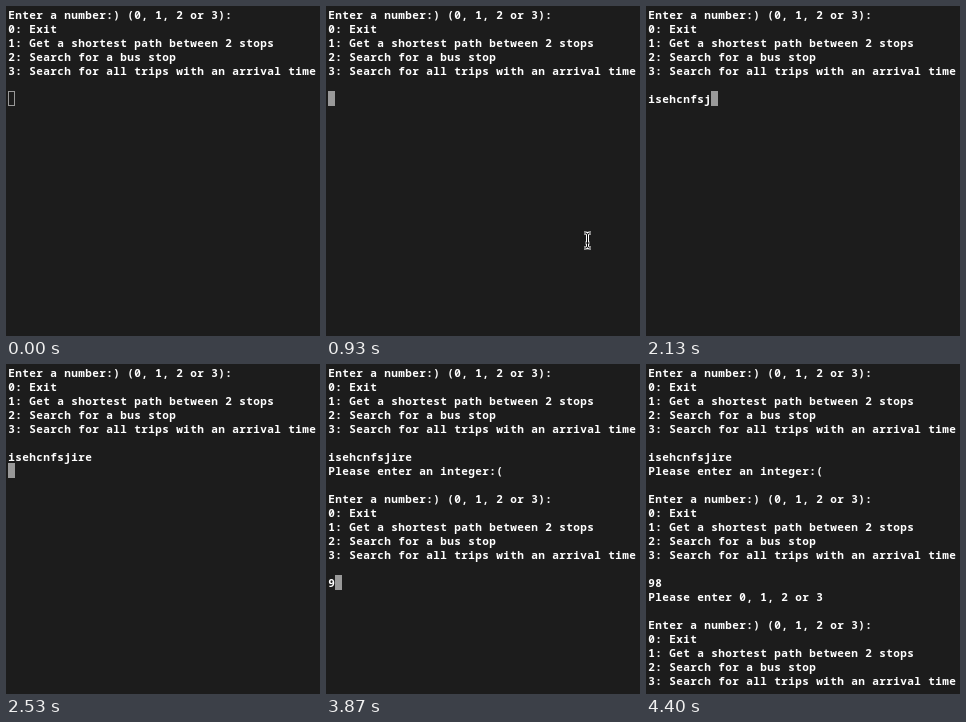
These frames come from a looping animation (314x330 px, 6740 ms). An HTML page with a canvas:

```html
<!DOCTYPE html>
<html lang="en">
<head>
<meta charset="utf-8">
<title>Terminal menu</title>
<style>
html, body { margin: 0; width: 100%; height: 100%; overflow: hidden; background: #1c1c1c; }
canvas { display: block; }
</style>
</head>
<body>
<canvas id="stage" width="314" height="330"></canvas>
<script>
const ctx = document.getElementById('stage').getContext('2d');
const LOOP = 6740, CELL = 7, LINE = 14, LEFT = 2;

const menu = [
  'Enter a number:) (0, 1, 2 or 3):',
  '0: Exit',
  '1: Get a shortest path between 2 stops',
  '2: Search for a bus stop',
  '3: Search for all trips with an arrival time',
  '', ''
].join('\n');
const word = 'isehcnfsjire';
const wrong = menu + word + '\n';
const again = wrong + 'Please enter an integer:(\n\n' + menu;
const outside = again + '98\n';

// Terminal contents from each start time on; the block cursor follows the last character.
const screens = [
  [0, menu],
  ...[[1800, 1], [1870, 3], [1930, 4], [2000, 6], [2130, 9], [2330, 12]]
    .map(([time, count]) => [time, menu + word.slice(0, count)]),
  [2530, wrong],
  [2600, again],
  [3870, again + '9'],
  [4070, again + '98'],
  [4270, outside],
  [4330, outside + 'Please enter 0, 1, 2 or 3\n\n'],
  [4400, outside + 'Please enter 0, 1, 2 or 3\n\n' + menu]
];

// Mouse pointer centre from each start time on.
const pointers = [
  [0, null], [530, [301.5, 240.5]], [600, [265.5, 240.5]],
  [800, [261.5, 234.5]], [1730, null]
];

const at = (steps, time) => steps.findLast(([start]) => start <= time)[1];

function drawText(text) {
  ctx.font = '600 11px "Noto Sans Mono", "DejaVu Sans Mono", monospace';
  ctx.textAlign = 'center';
  ctx.fillStyle = '#fff';
  text.split('\n').forEach((line, row) => {
    [...line].forEach((char, col) =>
      ctx.fillText(char, LEFT + (col + 0.5) * CELL, 13 + row * LINE));
  });
}

function drawCursor(text, focused) {
  const lines = text.split('\n');
  const x = LEFT + lines.at(-1).length * CELL;
  const y = 1 + (lines.length - 1) * LINE;
  ctx.fillStyle = ctx.strokeStyle = '#999';
  ctx.lineWidth = 1;
  if (focused) ctx.fillRect(x, y, CELL, 15);
  else ctx.strokeRect(x + 0.5, y + 0.5, CELL - 1, 14);
}

function drawPointer([x, y]) {
  const beam = new Path2D('M-3.5-7.5H-2Q0-7.5 0-5.5Q0-7.5 2-7.5H3.5' +
    'M0-5.5V5.5M-3.5 7.5H-2Q0 7.5 0 5.5Q0 7.5 2 7.5H3.5M-2 2.5H2');
  ctx.save();
  ctx.translate(x, y);
  for (const [color, width] of [['#fff', 3], ['#000', 1]]) {
    ctx.strokeStyle = color;
    ctx.lineWidth = width;
    ctx.stroke(beam);
  }
  ctx.restore();
}

function draw() {
  const time = performance.now() % LOOP;
  const text = at(screens, time);
  const pointer = at(pointers, time);
  ctx.fillStyle = '#1c1c1c';
  ctx.fillRect(0, 0, 314, 330);
  drawCursor(text, time >= 930);
  drawText(text);
  if (pointer) drawPointer(pointer);
  requestAnimationFrame(draw);
}
draw();
</script>
</body>
</html>
```
